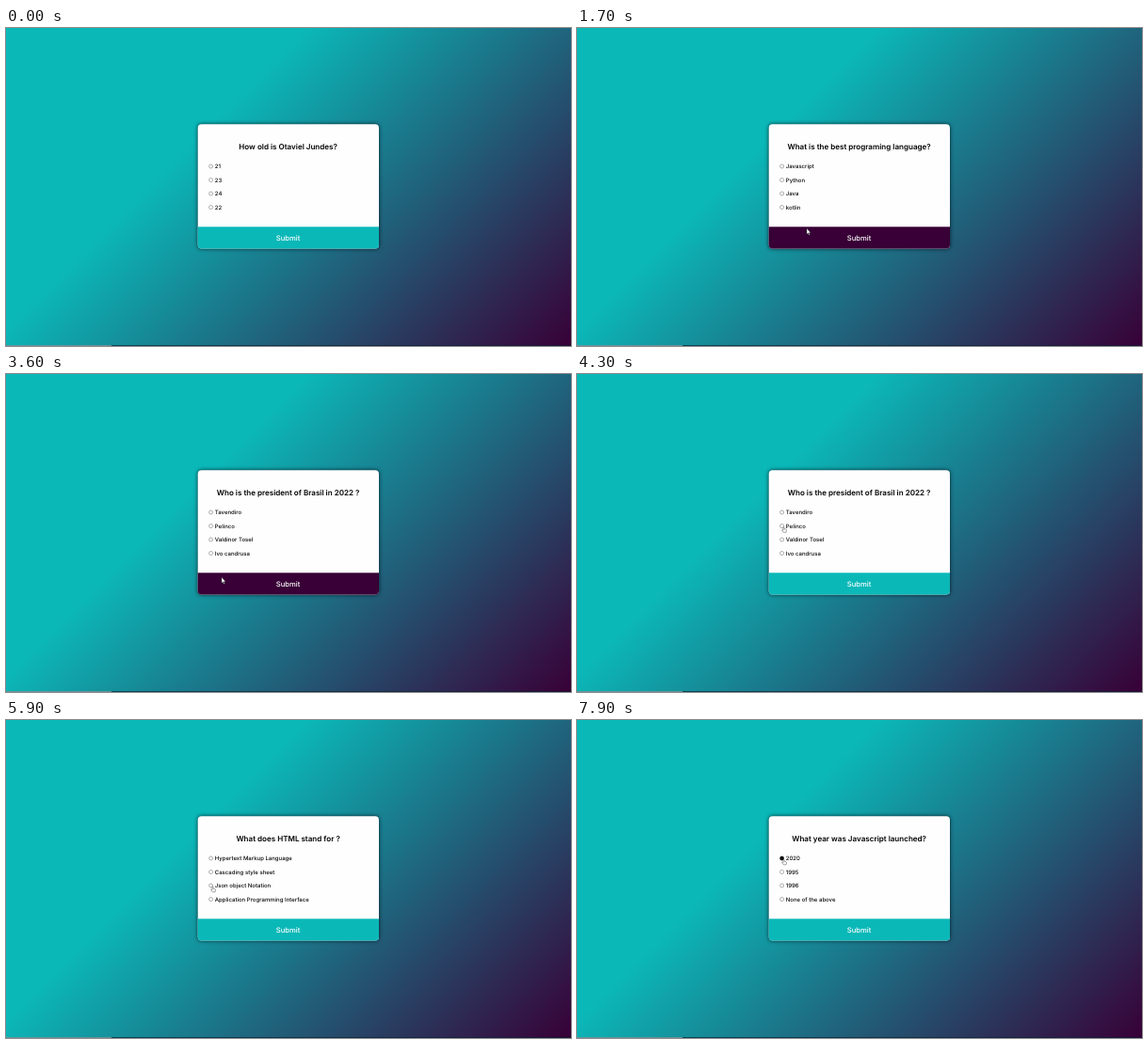
Recreate the animation shown at these times as an HTML page. Size 600 by 338 pixels, loop 8 s.

```html
<!DOCTYPE html>
<html lang="en">
<head>
<meta charset="utf-8">
<title>Quiz</title>
<style>
  html, body { margin: 0; width: 100%; height: 100%; overflow: hidden; }
  body { background: linear-gradient(315deg, #380036 0%, #0bb8b8 66%); }
  svg { position: absolute; left: 0; top: 0; }
  text { font-family: Inter, "Open Sans", sans-serif; font-weight: 500; text-rendering: geometricPrecision; }
  .taskbar { fill: rgba(8, 32, 52, .65); }
  .search { fill: rgba(200, 215, 215, .5); }
  .card { fill: #fefefe; filter: drop-shadow(0 0 2px rgba(0, 10, 20, .85)); }
  .title { font-size: 8.05px; font-weight: 600; text-anchor: middle; }
  .option { font-size: 6px; fill: #080808; }
  .label { font-size: 7.65px; fill: #fff; text-anchor: middle; }
  .ring { fill: #fff; stroke: #6c6c6c; stroke-width: .55; }
  .pointer { fill: #fff; stroke: #222; stroke-width: .4; stroke-linejoin: round; }
</style>
</head>
<body>
<svg width="600" height="338" viewBox="0 0 600 338">
  <rect class="taskbar" y="337" width="600" height="1"/>
  <rect class="search" y="337" width="112" height="1"/>
  <clipPath id="corners"><rect x="203.7" y="102.2" width="192.3" height="132.2" rx="4"/></clipPath>
  <rect class="card" x="203.7" y="102.2" width="192.3" height="132.2" rx="4"/>
  <rect id="submit" clip-path="url(#corners)" x="203" y="211.3" width="194" height="24"/>
  <text class="title" id="title" x="299.6" y="128.7"></text>
  <g id="options"></g>
  <text class="label" x="299.6" y="226"></text>
  <g class="pointer" id="pointer">
    <path id="arrow" d="M0 0V6.2L1.4 5L2.4 7.2L3.3 6.8L2.3 4.7H4.2Z"/>
    <path id="hand" d="M-.5 .4Q0 -.3 .5 .4V2.2L2.5 2.7Q3.1 2.9 3 3.6L2.6 5.8H-.2L-1.9 3.5Q-1.7 2.8-1 3.2L-.5 3.6Z"/>
  </g>
</svg>
<script>
const LOOP = 8000, STEP = 100;
const $ = id => document.getElementById(id);
const rowY = i => 147 + i * 14.5;

// reach: pointer gets to the answer; pick: answer is clicked; park: where it rests on the button
const questions = [
  { reach: 900, pick: 900, row: 3, park: [244, 213], title: "How old is Otaviel Jundes?",
    options: ["21", "23", "24", "22"] },
  { reach: 2800, pick: 2800, row: 2, park: [229, 216], title: "What is the best programing language?",
    options: ["Javascript", "Python", "Java", "kotlin"] },
  { reach: 4300, pick: 4900, row: 1, park: [231, 218], title: "Who is the president of Brasil in 2022 ?",
    options: ["Tavendiro", "Pelinco", "Valdinor Tosel", "Ivo candrusa"] },
  { reach: 5900, pick: 6100, row: 2, park: [233.5, 220.5], title: "What does HTML stand for ?",
    options: ["Hypertext Markup Language", "Cascading style sheet", "Json object Notation",
      "Application Programming Interface"] },
  { reach: 7700, pick: 7800, row: 0, park: [233, 218], title: "What year was Javascript launched?",
    options: ["2020", "1995", "1996", "None of the above"] }
];

// Every answer follows the same rhythm: click, move to the button, submit, leave
questions.forEach((q, i) => {
  const prev = questions[i - 1];
  q.start = prev ? prev.submit : 0;
  q.from = prev ? prev.park : [57, 286];
  q.depart = prev ? prev.leave : 100;
  q.spot = [219.5, rowY(q.row) + 1];
  q.parked = q.pick + 400;
  q.submit = q.pick + 700;
  q.leave = q.submit + 200;
});

function move(from, to, t, t0, t1) {
  const k = Math.min(1, Math.max(0, (t - t0) / (t1 - t0)));
  const e = Math.sin(k * Math.PI / 2);
  return from.map((v, i) => v + (to[i] - v) * e);
}

function add(tag, attrs) {
  const el = document.createElementNS("http://www.w3.org/2000/svg", tag);
  for (const key in attrs) el.setAttribute(key, attrs[key]);
  return $("options").appendChild(el);
}

const rows = [0, 1, 2, 3].map(i => ({
  ring: add("circle", { class: "ring", cx: 217.6, cy: rowY(i), r: 2 }),
  dot: add("circle", { cx: 217.6, cy: rowY(i) }),
  text: add("text", { class: "option", x: 221.8, y: rowY(i) + 2.2 })
}));
document.querySelector(".label").textContent = "Submit";

const show = (el, on) => { el.style.display = on ? "" : "none"; };

function draw(t) {
  const q = questions.filter(item => item.start <= t).pop();
  $("title").textContent = q.title;
  rows.forEach((row, i) => {
    const picked = i === q.row && t >= q.pick;
    const pressed = picked && t < q.pick + 200;
    row.text.textContent = q.options[i];
    row.ring.style.stroke = picked ? "#444" : "";
    row.dot.setAttribute("r", pressed ? 2.2 : 1.2);
    row.dot.setAttribute("fill", pressed ? "#101010" : "#444");
    show(row.dot, picked);
  });

  const [x, y] = t < q.pick
    ? move(q.from, q.spot, t, q.depart, q.reach)
    : move(q.spot, q.park, t, q.pick + 100, q.parked);
  const onOption = x < 224 && rows.some((_, i) => Math.abs(y - rowY(i)) < 4);
  $("pointer").setAttribute("transform", `translate(${x} ${y})`);
  show($("pointer"), t >= 100);
  show($("hand"), onOption);
  show($("arrow"), !onOption);

  const hover = questions.some(item => t > item.parked && t < item.leave);
  $("submit").style.fill = hover ? "#380036" : "#0bb8b8";
}

const start = performance.now();
let last = -1;
function tick() {
  const t = Math.floor(((performance.now() - start) % LOOP) / STEP) * STEP;
  if (t !== last) draw(last = t);
  requestAnimationFrame(tick);
}
tick();
</script>
</body>
</html>
```
